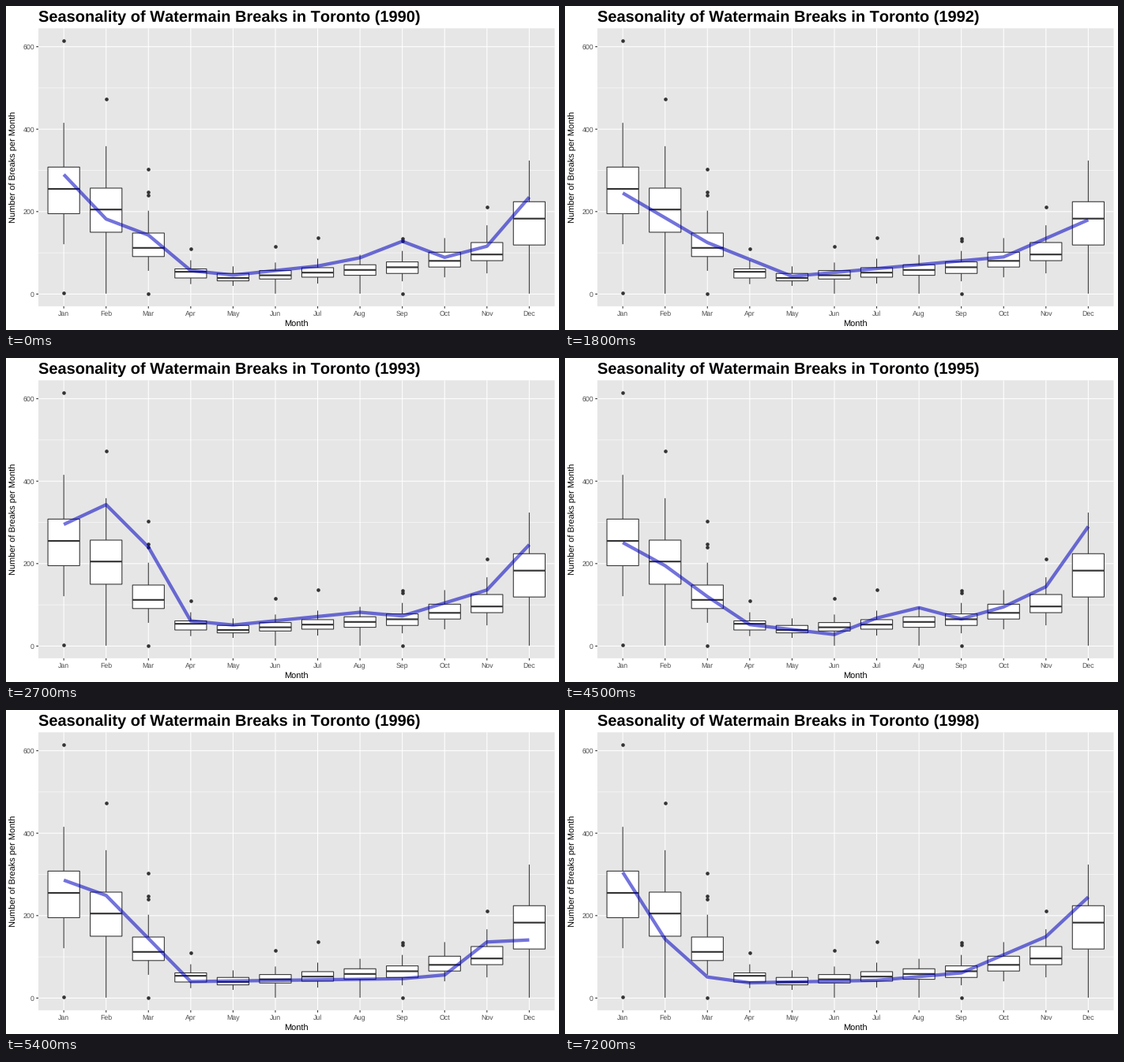
Recreate the animation shown at these times as a matplotlib script. Size 700 by 411 pixels, loop 8000 ms.

```python
import matplotlib.pyplot as plt
import numpy as np
from matplotlib.animation import FuncAnimation
from matplotlib.patches import Rectangle

W, H, DPI = 700, 411, 64
PT = 72 / DPI  # points per pixel
LEFT, RIGHT, TOP, BOTTOM = 41, 694.5, 28.3, 380.9
STEP = (RIGHT - LEFT) / 12.2
BOX_W = 0.75 * STEP
LOW, HIGH = 1, 614  # data range, padded by 5 % at each end
SCALE = (BOTTOM - TOP) / (1.1 * (HIGH - LOW))
INK, GREY = "#333333", "#4d4d4d"
FIRST_YEAR, HOLD = 1990, 9  # each year holds for nine ticks of 100 ms
MONTHS = "Jan Feb Mar Apr May Jun Jul Aug Sep Oct Nov Dec".split()


def season(**points):
    """Twelve monthly values, interpolated between the months given."""
    at = [MONTHS.index(name) for name in points]
    return np.interp(range(12), at, list(points.values()))


Q1 = season(Jan=195, Feb=150, Mar=91, Apr=39, May=32, Sep=50, Nov=81, Dec=119)
MEDIAN = season(Jan=255, Feb=205, Mar=112, Apr=54, May=39, Sep=65, Nov=96,
                Dec=183)
Q3 = season(Jan=308, Feb=257, Mar=148, Apr=61, May=50, Sep=78, Nov=125,
            Dec=224)
TO_FLOOR = ("Feb", "Jun", "Aug", "Dec")  # lower whisker reaches the minimum
OUTLIERS = dict(Jan=(HIGH, 3), Feb=(473,), Mar=(240, 248, 303, LOW),
                Apr=(109,), Jun=(115,), Jul=(137,), Sep=(128, 134, LOW),
                Nov=(212,))

YEARS = [
    season(Jan=290, Feb=182, Mar=143, Apr=57, May=46, Jul=68, Aug=88,
           Sep=128, Oct=89, Nov=116, Dec=235),
    season(Jan=390, Feb=152, Mar=92, Apr=57, May=62, Jun=115, Jul=137,
           Aug=83, Sep=67, Oct=96, Dec=324),
    season(Jan=245, Mar=125, May=43, Oct=90, Dec=180),
    season(Jan=295, Feb=343, Mar=240, Apr=61, May=51, Aug=82, Sep=73,
           Nov=136, Dec=246),
    season(Jan=614, Feb=473, Mar=248, Apr=82, May=43, Oct=88, Dec=150),
    season(Jan=251, Feb=195, Mar=120, Apr=52, Jun=28, Jul=68, Aug=93,
           Sep=66, Oct=95, Nov=144, Dec=290),
    season(Jan=286, Feb=249, Apr=40, Sep=47, Oct=56, Nov=136, Dec=141),
    season(Jan=262, Mar=110, May=17, Oct=85, Dec=160),
    season(Jan=305, Feb=143, Mar=51, Apr=37, Jul=43, Sep=61, Nov=149,
           Dec=245),
]

plt.rcParams.update({"font.family": "Liberation Sans", "text.hinting": "none",
                     "text.kerning_factor": 6, "path.snap": False})
fig = plt.figure(figsize=(W / DPI, H / DPI), dpi=DPI, facecolor="white")
ax = fig.add_axes([0, 0, 1, 1])
ax.set(xlim=(0, W), ylim=(H, 0))
ax.axis("off")


def px(month):
    return LEFT + (month + 0.6) * STEP


def py(value):
    return BOTTOM - SCALE * (value - LOW + 0.05 * (HIGH - LOW))


def line(xs, ys, color, width, z, **kw):
    return ax.plot(xs, ys, color=color, lw=width * PT, zorder=z,
                   solid_capstyle="butt", **kw)[0]


def label(x, y, text, size, color="black", **kw):
    style = {"ha": "center", "va": "baseline", "rotation_mode": "anchor", **kw}
    return ax.text(x, y, text, fontsize=size * PT, color=color, **style)


def draw_panel():
    ax.add_patch(Rectangle((LEFT, TOP), RIGHT - LEFT, BOTTOM - TOP,
                           fc="#e6e6e6", lw=0, zorder=0))
    for v in range(0, 700, 100):
        y = py(v)
        if v % 200:
            line((LEFT, RIGHT), (y, y), "white", 0.53, 1)
            continue
        line((LEFT, RIGHT), (y, y), "white", 1.07, 1)
        line((LEFT - 2.75, LEFT), (y, y), INK, 1.07, 1)
        label(36, y + 3.2, str(v), 8.8, GREY, ha="right")
    for m, name in enumerate(MONTHS):
        x = px(m)
        line((x, x), (TOP, BOTTOM), "white", 1.07, 1)
        line((x, x), (BOTTOM, BOTTOM + 2.75), INK, 1.07, 1)
        label(x, 393.4, name, 8.8, GREY)
    label((LEFT + RIGHT) / 2, 406.6, "Month", 11)
    label(13.2, (TOP + BOTTOM) / 2, "Number of Breaks per Month", 11,
          rotation=90)


def draw_box(m, name):
    x, q1, q3 = px(m), Q1[m], Q3[m]
    low = LOW if name in TO_FLOOR else 0.62 * q1
    high = q3 + 0.95 * (q3 - q1)
    line((x, x), (py(low), py(high)), INK, 1.07, 2)
    ax.add_patch(Rectangle((x - BOX_W / 2, py(q3)), BOX_W, py(q1) - py(q3),
                           fc="white", ec=INK, lw=1.07 * PT, zorder=3))
    line((x - BOX_W / 2, x + BOX_W / 2), (py(MEDIAN[m]),) * 2, INK, 2.13, 4)
    for v in OUTLIERS.get(name, ()):
        ax.plot(x, py(v), "o", color=INK, ms=4.6 * PT, mew=0, zorder=4)


draw_panel()
for month, month_name in enumerate(MONTHS):
    draw_box(month, month_name)

title = label(40.6, 20, "", 20, weight="bold", ha="left")
trend = line(px(np.arange(12)), py(YEARS[0]), "#0000c0", 4.27, 5, alpha=0.55,
             solid_joinstyle="round")


def update(tick):
    i = tick // HOLD
    title.set_text(
        f"Seasonality of Watermain Breaks in Toronto ({FIRST_YEAR + i})")
    trend.set_ydata(py(YEARS[i]))
    return title, trend


anim = FuncAnimation(fig, update, frames=80, interval=100, repeat=True,
                     repeat_delay=0)
plt.show()
```
